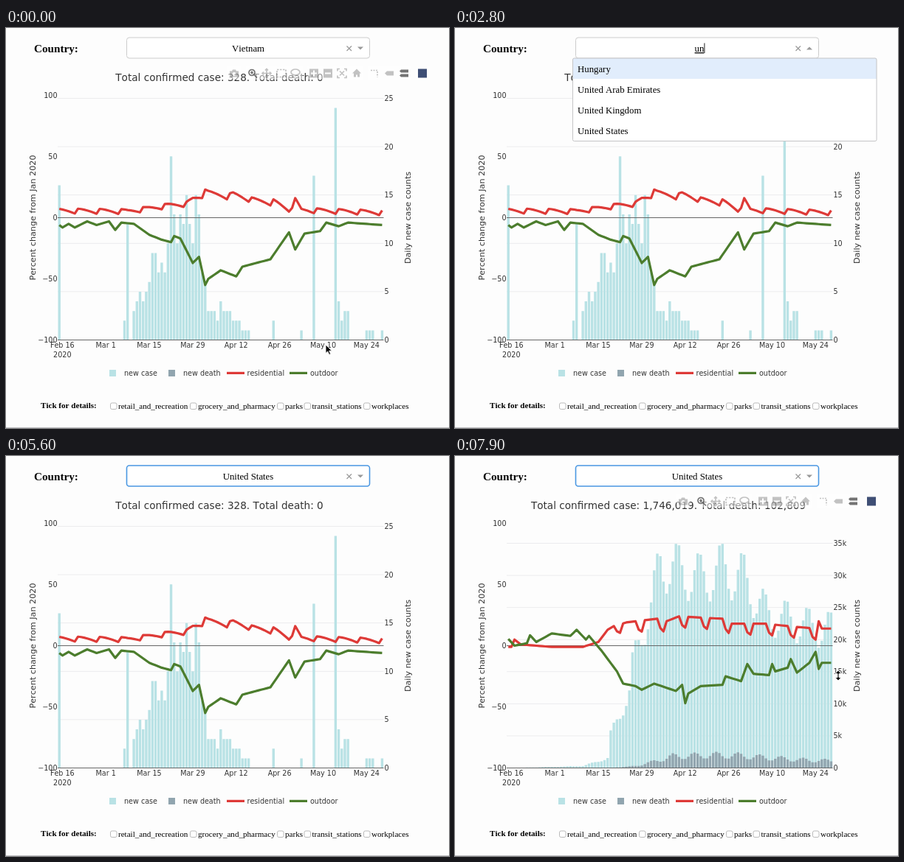
Write an HTML page that moves like this. It is 600x543 px and loops after 8 s.

```html
<!DOCTYPE html>
<html lang="en">
<head>
<meta charset="utf-8">
<title>Mobility dashboard</title>
<style>
  html, body { margin: 0; width: 100%; height: 100%; overflow: hidden; background: #fdfdfd; }
  svg { display: block; }
  text { white-space: pre; font-kerning: none; }
  .ui { font-family: "Liberation Serif", "Times New Roman", serif; fill: #000; }
  .plot { font: 9.6px "DejaVu Sans", Verdana, sans-serif; fill: #333; }
  .line { fill: none; stroke-width: 3.2; stroke-linejoin: round; }
  .mid { text-anchor: middle; }
  .end { text-anchor: end; }
</style>
</head>
<body>
<svg id="stage" width="100%" height="100%" viewBox="0 0 600 543"></svg>
<script>
const LOOP = 8000, BASE = 423.5, ZERO = 257.5;
const CASE = '#b9e2e5', DEATH = '#91a5af', RED = '#de3a37', GREEN = '#4c7d2d';
const dayX = d => 72.2 + 4.204 * d;
const range = n => [...Array(n).keys()];

// Rows of time followed by values, linear in between.
function at(keys, t) {
  const n = keys.findIndex(k => k[0] > t);
  if (n < 0) return keys.at(-1).slice(1);
  const a = keys[n - 1], b = keys[n], p = (t - a[0]) / (b[0] - a[0]);
  return a.slice(1).map((v, i) => v + (b[i + 1] - v) * p);
}

// Daily series: a trend through key points, shaped by a weekly rule. Day 0 is a Saturday.
const daily = (keys, shape = v => v) => range(105).map(d => shape(at(keys, d)[0], d));
const wave = (d, peak) => Math.cos((d - peak) * 2 * Math.PI / 7);
const noise = d => {
  const s = Math.sin(d * 12.9898) * 43758.5453;
  return 2 * (s - Math.floor(s)) - 1;
};
const weekSag = (v, d) => v - 4 * ((d + 1) % 7 / 6) ** 1.5;
const weekendDrop = (v, d) => v - (d > 34 && d % 7 < 2 ? (d > 41 ? 7 : 5) + 2 * (d % 7) : 0);

const clusters = new Map([[0, 16], [21, 2], [22, 12], [36, 19], [69, 2], [78, 1], [82, 17], [89, 24]]);
const vietnam = {
  title: 'Total confirmed case: 328. Total death: 0',
  unit: 13.12, step: 5, ticks: 6, suffix: '',
  cases: daily([[0, 0], [23, 0], [24, 4], [32, 8], [44, 13], [48, 4], [58, 2], [61, 1], [62, 0],
    [89, 0], [90, 3], [93, 3], [94, 0], [97, 0], [98, .6]],
    (v, d) => clusters.get(d) ?? Math.round(v * (1 + .35 * noise(d)))),
  deaths: [],
  residential: daily([[0, 7.5], [22, 7], [28, 9], [36, 12], [41, 13], [43, 17], [46, 19], [47, 27], [48, 22],
    [54, 19], [56, 21], [61, 17], [68, 14], [69, 15], [74, 8], [76, 16], [78, 8], [104, 6]], weekSag),
  outdoor: daily([[0, -6], [1, -8], [3, -5], [5, -8], [9, -3], [12, -6], [16, -3], [18, -10], [20, -4], [24, -5],
    [29, -14], [33, -18], [36, -20], [37, -15], [39, -17], [43, -37], [45, -32], [47, -55], [48, -50], [52, -43],
    [57, -48], [59, -40], [68, -34], [74, -12], [76, -26], [79, -13], [84, -11], [86, -4], [90, -7], [93, -4],
    [104, -6]]),
};
const usa = {
  title: 'Total confirmed case: 1,746,019. Total death: 102,809',
  unit: 8.714, step: 5, ticks: 8, suffix: 'k',
  cases: daily([[0, 0], [24, .3], [32, 1.5], [33, 5.2], [36, 8.4], [39, 11.7], [40, 16], [43, 21], [46, 25],
    [49, 32], [54, 31], [62, 29.5], [69, 31], [76, 29.5], [83, 24], [97, 22], [104, 21.5]],
    (v, d) => v * (1 + .14 * wave(d, 5.5))),
  deaths: daily([[0, 0], [33, .05], [39, .2], [43, .5], [53, 1.8], [66, 2], [75, 1.9], [83, 1.6], [97, 1.2],
    [104, 1.1]], (v, d) => v * (1 + .27 * wave(d, 4))),
  residential: daily([[0, -1], [1, -1], [2, 5], [4, 1], [14, -1], [24, -1], [29, 3], [32, 13], [34, 16], [38, 19],
    [48, 22], [51, 20], [55, 24], [69, 22], [72, 18], [83, 18], [90, 16], [99, 14], [100, 20], [101, 14]],
    weekendDrop),
  outdoor: daily([[0, 5.5], [2, 0], [6, 2], [7, 8.5], [9, 3], [14, 10], [20, 8], [22, 13], [25, 5], [26, 8],
    [30, -4], [35, -21], [37, -31], [41, -33], [43, -36], [47, -31], [54, -37], [56, -32], [57, -47], [58, -39],
    [62, -33], [69, -32], [70, -25], [75, -29], [77, -15], [79, -23], [84, -24], [85, -15], [86, -21], [90, -18],
    [91, -11], [93, -22], [97, -14], [99, -5], [100, -19], [101, -14]]),
};

const label = (x, y, s, cls = '', more = '') => `<text x="${x}" y="${y}" class="${cls}" ${more}>${s}</text>`;
const box = (x, y, w, h, fill, more = '') => `<rect x="${x}" y="${y}" width="${w}" height="${h}" fill="${fill}" ${more}/>`;
const path = (d, more) => `<path d="${d}" ${more}/>`;

const bars = (values, unit, fill) => path(values.map((v, d) =>
  v ? `M${dayX(d) - 1.7} ${BASE}v${-v * unit}h3.4v${v * unit}z` : '').join(''), `fill="${fill}"`);
const curve = (values, color) => path('M' + values.map((v, d) => `${dayX(d)} ${ZERO - v * 1.661}`).join('L'),
  `class="line" stroke="${color}"`);

function chart(id, d) {
  const ticks = range(d.ticks).map(k => ({ y: BASE - k * d.step * d.unit, s: k ? k * d.step + d.suffix : '0' }));
  return `<g id="${id}">` +
    ticks.map(t => path(`M70 ${t.y}H511.5`, 'stroke="#ececee"') + label(512.5, t.y + 3.5, t.s)).join('') +
    bars(d.cases, d.unit, CASE) + bars(d.deaths, d.unit, DEATH) +
    path(`M70 ${ZERO}H511.5M70 ${BASE}H511.5`, 'stroke="#666"') +
    curve(d.residential, RED) + curve(d.outdoor, GREEN) +
    label(289, 71.5, d.title, 'mid', 'font-size="13.6"') + '</g>';
}

function axes() {
  const dates = ['Feb 16', 'Mar 1', 'Mar 15', 'Mar 29', 'Apr 12', 'Apr 26', 'May 10', 'May 24'];
  const turned = (x, s) => label(0, 0, s, 'mid', `font-size="11.2" transform="translate(${x} 257.5) rotate(-90)"`);
  return dates.map((s, i) => label(76.3 + 58.86 * i, 434, s, 'mid')).join('') + label(76.3, 446.5, '2020', 'mid') +
    [100, 50, 0, -50, -100].map(v => label(69.5, ZERO + 3.5 - v * 1.661, String(v).replace('-', '−'), 'end')).join('') +
    turned(40, 'Percent change from Jan 2020') + turned(548, 'Daily new case counts') +
    box(140, 464, 9, 9, CASE) + label(160, 472, 'new case') +
    box(220, 464, 9, 9, DEATH) + label(240, 472, 'new death') +
    path('M299 468.4h24', `class="line" stroke="${RED}"`) + label(326.5, 472, 'residential') +
    path('M384 468.4h24', `class="line" stroke="${GREEN}"`) + label(412, 472, 'outdoor');
}

function toolbar() {
  const solid = [
    [309, 'M-6-3h3l1-2h4l1 2h3v8h-12zM2.5 1a2.5 2.5 0 1 0-5 0a2.5 2.5 0 1 0 5 0z'],
    [417, 'M-6-6h12v12h-12zM-1-4v3h-3v2h3v3h2v-3h3v-2h-3v-3z'],
    [436, 'M-6-6h12v12h-12zM-4-1v2h8v-2z'],
    [475, 'M-6 0l6-6 6 6h-2v5h-3v-3h-2v3h-3v-5z'],
    [519, 'M-6 0l3-3h9v6h-9z'],
    [539, 'M-6-3l2-2h10v4h-10zM-6 3l2-2h10v4h-10z'],
  ];
  const outline = [
    [334, 'M3-1a4 4 0 1 0-8 0a4 4 0 1 0 8 0zM2 2l4 4M-3-1h4M-1-3v4'],
    [353, 'M-6 0h12M0-6v12M-2-4l2-2 2 2M-2 4l2 2 2-2M-4-2l-2 2 2 2M4-2l2 2-2 2'],
    [373, 'M-6-5h12v10h-12z', 'stroke-dasharray="2.5 1.5"'],
    [392, 'M6-1.5a6 4 0 1 0-12 0a6 4 0 1 0 12 0zM-4 2q0 3 3 4'],
    [455, 'M-6-3v-3h3M3-6h3v3M6 3v3h-3M-3 6h-3v-3M-3-3l6 6M3-3l-6 6'],
    [499, 'M-5-4h9v9', 'stroke-dasharray="2 1.5"'],
  ];
  const icon = (paint, [x, d, more = '']) => path(d, `transform="translate(${x} 61.5)" ${paint} ${more} ` +
    `opacity="${x === 334 || x === 539 ? .75 : .32}"`);
  return '<g id="toolbar">' + [[300, 18], [325, 77], [408, 76], [490, 58], [556, 18]]
    .map(([x, w]) => box(x, 52, w, 18, '#fff', 'opacity=".5"')).join('') +
    solid.map(i => icon('fill="#444" fill-rule="evenodd"', i)).join('') +
    outline.map(i => icon('fill="none" stroke="#444" stroke-width="1.7"', i)).join('') +
    box(558, 55.5, 12, 12, '#3f4f75') + '</g>';
}

const details = [[141, 'retail_and_recreation'], [249, 'grocery_and_pharmacy'], [367, 'parks'],
  [403.5, 'transit_stations'], [484, 'workplaces']];
const stage = document.getElementById('stage');
stage.innerHTML =
  `<g class="plot">${chart('before', vietnam)}${chart('after', usa)}${axes()}${toolbar()}</g>` +
  '<g class="ui">' + label(38, 33, 'Country:', '', 'font-size="15.2" font-weight="700"') +
  label(47, 515.5, 'Tick for details:', '', 'font-size="11.1" font-weight="700"') +
  details.map(([x, s]) => box(x + .5, 509, 8.5, 8.5, '#fff', 'rx="2" stroke="#aaa" stroke-width=".8"') +
    label(x + 11, 516.5, s, '', 'font-size="11.1"')).join('') +
  '<g id="select" font-size="12.8"></g></g>' +
  path('M0 542.5H600', 'stroke="#c2c2c4"') +
  '<g id="cursor" stroke-linejoin="round">' +
  path('M0 0v11.5l2.7-2.5 2 4.4 2-.9-2-4.3h3.7z', 'id="arrow" stroke="#fff" stroke-width=".9"') +
  path('M-3-6q3 0 3 2v8q0 2-3 2M3-6q-3 0-3 2v8q0 2 3 2M-2 1h4', 'id="beam" fill="none" stroke="#222"') +
  path('M0-7l4 4.5h-3v5h3l-4 4.5-4-4.5h3v-5h-3z', 'id="resize" stroke="#fff" stroke-width=".9"') + '</g>';
const el = id => document.getElementById(id);

const united = ['United Arab Emirates', 'United Kingdom', 'United States'];
const lastRows = [...united, 'Uruguay', 'Venezuela', 'Vietnam'];
const withU = ['Aruba', 'Australia', 'Austria', 'Belarus', 'Belgium', 'Bulgaria'];
const withUn = ['Hungary', ...united];
const steps = [
  { at: 0, value: 'Vietnam' },
  { at: 1400, value: 'Vietnam', rows: lastRows, focus: 5, scroll: 8.5 },
  ...range(7).map(i => ({
    at: 2300 + 300 * i, query: 'united '.slice(0, i + 1), rows: [withU, withUn][i] ?? united, focus: 0,
  })),
  { at: 4800, query: 'united ', rows: united, focus: 1 },
  { at: 5000, query: 'united ', rows: united, focus: 2 },
  { at: 5200, value: 'United States', active: true },
];

function menu({ rows, focus, scroll = 0 }) {
  const h = Math.min(rows.length * 28, 159);
  return box(159.5, 41, 411.5, h, '#fff', 'rx="2"') + `<svg x="160" y="41" width="411" height="${h}">` +
    rows.map((s, i) => {
      const y = i * 28 - scroll;
      return (i === focus ? box(0, y, 411, 28, '#e1edfc') : '') +
        label(6, y + 18.5, s, '', s === 'Vietnam' ? 'font-weight="700"' : '');
    }).join('') + '</svg>' +
    box(159.5, 41, 411.5, h + .5, 'none', 'rx="2" stroke="#c4c4c6"');
}

function drawSelect(s) {
  const ring = s.active ? 'stroke="#4a97e2" stroke-width="1.6"' : 'stroke="#ccc"';
  el('select').innerHTML = box(163.5, 13, 329, 28, '#fff', `rx="3.5" ${ring}`) +
    label(s.query ? 331 : 328, 31.5, s.query || s.value, 'mid', 'id="entry"') +
    path('M461.5 24.5l6.5 6.5m0-6.5l-6.5 6.5', 'stroke="#999" stroke-width="1.2"') +
    path(s.rows ? 'M476 29.5h8l-4-4z' : 'M476 25.5h8l-4 4z', 'fill="#999"') + (s.rows ? menu(s) : '');
  if (!s.query) return;
  const half = el('entry').getComputedTextLength() / 2;
  const composing = !s.query.endsWith(' ');
  el('select').insertAdjacentHTML('beforeend', box(331 + half, 20.5, 1, 13.5, '#222') +
    (composing ? box(331 - half, 33, 2 * half, 1.5, '#222') : ''));
}

const pointer = [[0, 433, 430], [200, 433, 430], [500, 405, 300], [800, 345, 90], [1000, 325, 25], [1200, 323, 24],
  [7300, 323, 24], [7500, 390, 100], [7700, 485, 240], [7900, 519, 298]];
const toolbarFade = [[0, 1], [800, 1], [1100, 0], [7500, 0], [7800, 1]];

let current;
function render(time) {
  const t = Math.floor(time / 100) * 100 % LOOP;
  const step = steps.findLast(s => s.at <= t);
  if (step !== current) drawSelect(current = step);
  const show = (id, on) => el(id).style.display = on ? '' : 'none';
  show('before', t < 6000);
  show('after', t >= 6000);
  el('toolbar').style.opacity = at(toolbarFade, t)[0];
  const [x, y] = at(pointer, t);
  el('cursor').setAttribute('transform', `translate(${x} ${y})`);
  show('cursor', t < 2300 || t > 7300);
  show('beam', y < 41);
  show('resize', x > 511);
  show('arrow', y >= 41 && x <= 511);
}
const start = performance.now();
(function tick() {
  render(performance.now() - start);
  requestAnimationFrame(tick);
})();
</script>
</body>
</html>
```
